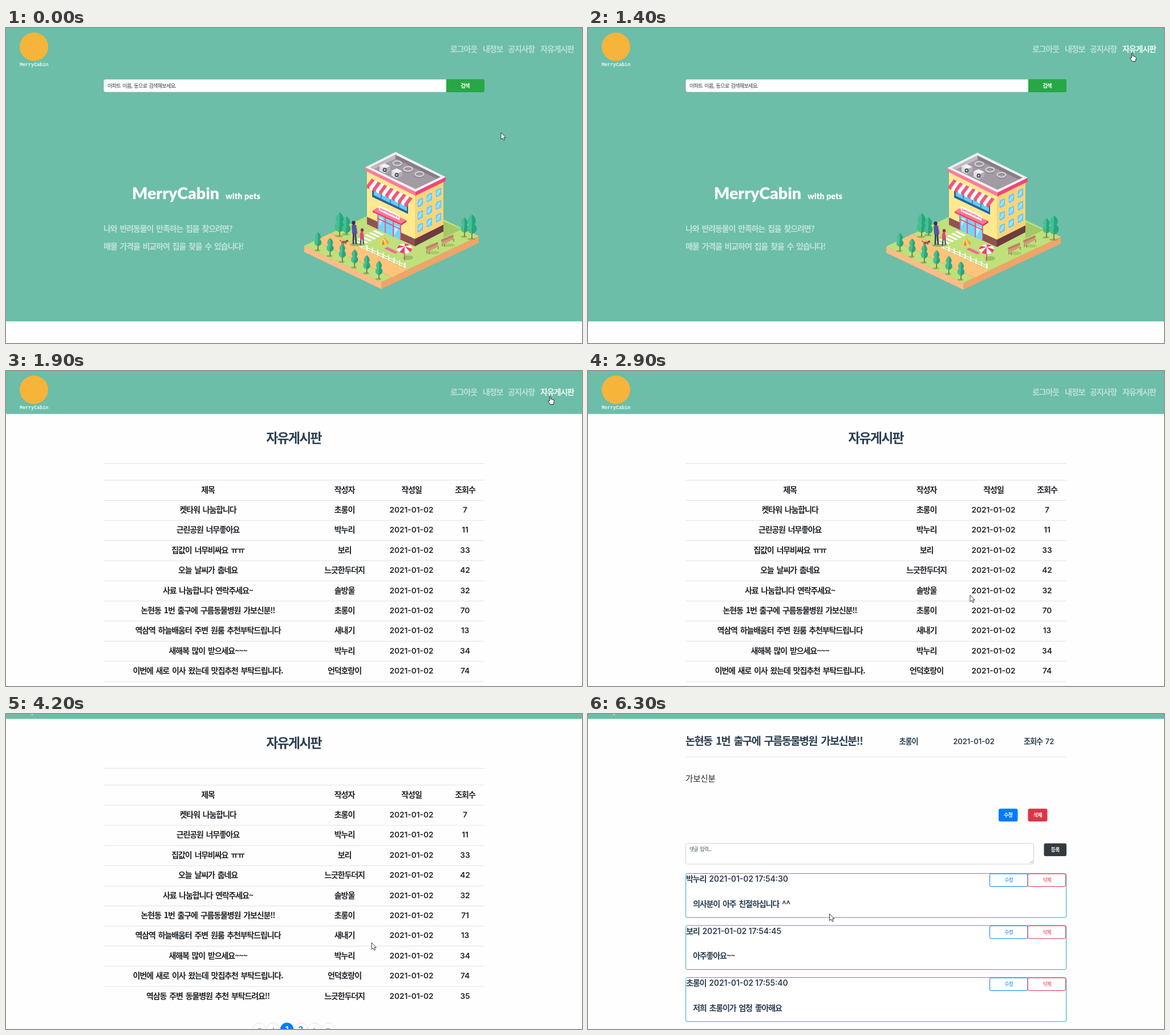
An HTML page for the animation above (8 s loop, 1010 px wide and 554 px high).

```html
<!DOCTYPE html>
<html lang="ko">
<head>
<meta charset="utf-8">
<title>MerryCabin</title>
<style>
html, body { margin: 0; width: 100%; height: 100%; overflow: hidden; background: #fefefe; }
svg { display: block; width: 1010px; height: 554px; }
text { font-family: "Noto Sans CJK KR", "Noto Sans CJK", sans-serif; font-weight: 700; letter-spacing: -.08em; word-spacing: .15em; }
.num { font-family: Inter, sans-serif; font-weight: 600; letter-spacing: 0; word-spacing: 0; }
.brand { font-family: Lato, sans-serif; font-weight: 900; letter-spacing: 0; word-spacing: 0; }
.mono { font-family: "Liberation Mono", monospace; letter-spacing: 0; }
.thin { font-weight: 500; }
.wide { font-weight: 300; letter-spacing: 0; }
</style>
</head>
<body>
<svg id="stage" viewBox="0 0 1010 554"></svg>
<script>
const GREEN = '#6cbea8', INK = '#212529', NAVY = '#2c3e50', RULE = '#dee2e6', BLUE = '#007bff', RED = '#dc3545';

// Drawing helpers, each returning SVG markup
const text = (x, y, s, size, fill = INK, anchor = 'start', cls = '') =>
  `<text x="${x}" y="${y}" font-size="${size}" fill="${fill}" text-anchor="${anchor}" class="${cls}">${s}</text>`;
const mid = (x, y, s, size, fill, cls) => text(x, y, s, size, fill, 'middle', cls);
const num = (x, y, s, size = 13.7, fill = INK) => mid(x, y, s, size, fill, 'num');
const rect = (x, y, w, h, fill, r = 0, stroke = 'none') =>
  `<rect x="${x}" y="${y}" width="${w}" height="${h}" rx="${r}" fill="${fill}" stroke="${stroke}"/>`;
const poly = (pts, fill, stroke = 'none') => `<polygon points="${pts}" fill="${fill}" stroke="${stroke}"/>`;
const path = (d, stroke, w = 1, fill = 'none') =>
  `<path d="${d}" stroke="${stroke}" stroke-width="${w}" fill="${fill}"/>`;
const oval = (x, y, rx, ry, fill, extra = '') => `<ellipse cx="${x}" cy="${y}" rx="${rx}" ry="${ry}" fill="${fill}" ${extra}/>`;
const rule = y => path(`M171 ${y}H839`, RULE);
const many = (n, f) => Array.from({ length: n }, (_, i) => f(i)).join('');
const group = (id, body) => `<g id="${id}">${body}</g>`;

function header() {
  const soft = 'rgba(255,255,255,.54)';
  return rect(0, 0, 1010, 75.6, GREEN) +
    `<circle cx="49" cy="33" r="25" fill="#f6b43a"/>` +
    text(24, 66.5, 'MerryCabin', 8.4, '#e9faf4', 'start', 'mono') +
    text(779, 42, '로그아웃', 14, soft) + text(836, 42, '내정보', 14, soft) +
    text(880, 42, '공지사항', 14, soft) +
    `<g id="hot">${text(937, 42, '자유게시판', 14, '#fff')}</g>`;
}

function tree(x, top, h, foot) {
  const w = h * .27, b = top + h;
  const half = (dir, fill) => `<path fill="${fill}" d="M${x} ${top}` +
    `C${x + dir * w * .9} ${top + h * .2} ${x + dir * w * .9} ${top + h * .4} ${x + dir * w * .5} ${top + h * .5}` +
    `C${x + dir * w * 1.2} ${top + h * .65} ${x + dir * w} ${b - h * .05} ${x} ${b}z"/>`;
  return oval(x - 1, foot, w * .8, 1.8, '#6f9a4f', 'opacity=".6"') +
    path(`M${x} ${b - 1}V${foot}`, '#8a5a4a', 1.6) + half(-1, '#43c092') + half(1, '#27a67f') +
    path(`M${x} ${b - h * .3}V${b}`, '#5f7a52', .8);
}

function ground() {
  return poly('523,383 694,302 829,366 658,447', '#bfe07a') +
    poly('523,383 658,447 658,459 523,394', '#fbbd85') +
    poly('658,447 829,366 829,378 658,459', '#f0a468') +
    poly('542,374 569,361 704,425 677,438', '#ffc47a') +
    path('M542 374L677 438M569 361L704 425', '#e5a968', .8) +
    poly('767,340 799,354 767,369', '#a3c866');
}

function roof() {
  const ring = (x, y) => oval(x, y + 1.5, 7.5, 4, 'none', 'stroke="#857e88" stroke-width="2.6"') +
    oval(x, y, 7.5, 4, 'none', 'stroke="#d2ccd2" stroke-width="2.6"');
  const fan = (x, y) => poly([x - 9, y - 5, x + 1, y, x + 1, y + 9, x - 9, y + 4], '#dddce2') +
    poly([x - 9, y - 5, x, y - 9, x + 10, y - 4, x + 1, y], '#f3f2f5') +
    poly([x + 1, y, x + 10, y - 4, x + 10, y + 4, x + 1, y + 9], '#b3b0ba') +
    oval(x, y + 2.5, 3.4, 3.8, '#4a525a') + oval(x, y + 2.5, 1.5, 1.8, '#c9d2d6');
  return poly('630,245 718,288 718,295 630,251', '#ff7a9d') +
    poly('718,288 771,262 771,269 718,295', '#f0457f') +
    poly('630,245 683,218 771,262 718,288', '#f1eff1') +
    poly('639,245 683,223 762,262 718,283', '#857e87') +
    poly('639,245 683,223 683,230 646,248', '#c0bac1') +
    poly('646,248 683,230 755,265 718,283', '#a29ba4') +
    ring(686, 238) + ring(705, 248) + ring(725, 257) + fan(664, 247) + fan(685, 256);
}

function building() {
  const wnd = i => {
    const x = 721 + 16 * (i % 3), y = 302 - 8.8 * (i % 3) + 22 * Math.floor(i / 3);
    return poly([x, y, x + 10, y - 5, x + 10, y + 10, x, y + 15], '#fff6d8') +
      poly([x + 1, y + .5, x + 9.3, y - 3.5, x + 9.3, y + 9.5, x + 1, y + 13.5], '#7ad6f8', '#5fb4da') +
      path(`M${x + 2} ${y + 9}l6-8`, '#d4f4ff', 1.3);
  };
  const stripe = i => {
    const x = 641 + 5.54 * i, y = 265 + 2.65 * i;
    return `<path fill="${i % 2 ? '#fff' : '#f8557c'}" d="M${x} ${y}l5.54 2.65-9 12v2.5q-2.5 2.5-5.54-2.5v-2.5z"/>`;
  };
  return poly('633,252 717,292 717,384 633,345', '#ffe98f') +
    poly('717,292 767,268 767,358 717,384', '#f9d476') +
    poly('633,332 717,371 717,384 633,345', '#8d5352') +
    poly('717,371 767,346 767,358 717,384', '#6d3b40') +
    poly('642,281 705,311 705,327 642,297', '#2d5f9f') +
    poly('645,283 703,311 703,322 645,294', '#62cdf5') +
    path('M658 288v12M674 296v12M689 303v12', '#2d5f9f', 1.2) +
    many(13, stripe) +
    poly('652,328 692,347 692,373 652,354', '#78d4f7') +
    poly('655,332 662,335 655,348', '#b9edff') + poly('681,346 690,350 681,364', '#b9edff') +
    path('M652 327V354M665 334V360M679 340V367M692 346V373M652 335L692 354', '#ec4670', 1.5) +
    poly('643,321 651,316 702,338 693,344', '#ff7897') +
    poly('643,321 693,344 693,347 643,324', '#ec3e6c') +
    poly('693,344 702,338 702,341 693,347', '#c92f5d') +
    poly('654,312 690,329 690,338 654,321', '#fff') +
    `<g transform="matrix(1 .47 0 1 656 319.5)">${text(0, 0, 'petshelters', 6, '#e3365f', 'start', 'num')}</g>` +
    many(9, wnd) + roof();
}

function people() {
  return oval(616, 381, 13, 2.5, '#8fae60') +
    path('M609.5 360L609 380M612.5 360L614 380', '#3d3a60', 2.8) +
    `<path fill="#5653a8" d="M606 347q4-2.5 8.5 0l1.5 15h-9z"/>` + path('M614.5 348l2.5 12', '#e8a58a', 1.4) +
    oval(609.5, 342.5, 3.2, 3.6, '#39304c') +
    path('M623 368L621.5 381M625.5 368L627 380', '#3d3a60', 2) +
    `<path fill="#e5476f" d="M621 360q3-2.5 5.5 0l1.5 10h-7.5z"/>` + oval(624.5, 355.5, 2.7, 3.3, '#8d3551') +
    path('M620 364l-3 4', '#e8a58a', 1.2) +
    oval(592.5, 376.5, 4.6, 2.2, '#94614f') + oval(598, 374.5, 2.2, 2, '#7a4d45') +
    path('M589 377v4M592 378v3M596 377v3M588 375l-3-2', '#7a4d45', 1.2);
}

function garden() {
  const bench = (x, y) => oval(x + 2, y + 9, 11, 3, '#a9ca69') +
    poly([x - 11, y - 1, x + 10, y - 10, x + 11, y - 5, x - 10, y + 4], '#c98a6c') +
    path(`M${x - 11} ${y + 1.5}l21.5-9`, '#a66a55', .8) +
    poly([x - 10, y + 4, x + 9, y - 4, x + 12, y - 2, x - 6, y + 7], '#d39a78') +
    path(`M${x - 9} ${y + 5}v6M${x - 5} ${y + 7}v5M${x + 11} ${y - 2}v5`, '#94604f', 1.1);
  const wedge = i => {
    const a = i * Math.PI / 4, p = k => `${699 + 13 * Math.cos(k)} ${388 + 8.5 * Math.sin(k)}`;
    return `<path fill="${i % 2 ? '#fff' : '#ef3e6b'}" d="M699 384L${p(a)}A13 8.5 0 0 1 ${p(a + Math.PI / 4)}z"/>`;
  };
  return many(6, i => {
    const x = 647 - 7 * i, y = 355.5 + 3.5 * i;
    return poly([x, y, x + 16, y + 7.6, x + 12, y + 9.4, x - 4, y + 1.8], '#fff');
  }) +
    poly('661,366 655,383 669,381', '#ffd15c') + poly('661,366 669,381 672,377', '#eda63c') + poly('661,372 659,382 664,381', '#c98a45') +
    poly('663,388 669,385 688,394 682,397', '#f2799a') +
    path('M666 387L685 396M669 386.5l-3 2M678 391l-3 2', '#d65078', .7) +
    path('M613 377L700 417M613 381L700 421', '#fff', 1.2) +
    many(10, i => path(`M${614 + 9.5 * i} ${373 + 4.4 * i}v10`, '#fff', 2)) +
    oval(705, 404, 9, 4, '#9dbf62') + path('M699 388V409', '#e63f68', 1.5) + many(8, wedge) +
    bench(747, 386) + bench(774, 373);
}

function scene() {
  return ground() + tree(585, 324, 35, 366) + tree(597, 331, 30, 363) + building() + garden() + people() +
    tree(804, 333, 27, 367) + tree(817, 328, 34, 371) +
    many(6, i => tree(547 + 21.4 * i, 359 + 10.1 * i, 25, 391 + 10.1 * i));
}

function home() {
  const pale = 'rgba(255,255,255,.58)';
  return rect(0, 75, 1010, 441, GREEN) +
    rect(171.5, 90.5, 620, 22, '#fff', 3, '#ced4da') + rect(772, 90, 67, 23, '#28a745', 3) + rect(772, 90, 10, 23, '#28a745') +
    text(178, 105.2, '아파트 이름, 동으로 검색해보세요.', 9.1, '#343a40', 'start', 'thin') +
    mid(805, 105.2, '검색', 9.3, '#fff') +
    text(221, 301, 'MerryCabin', 28.5, '#fff', 'start', 'brand') +
    text(385, 301, 'with pets', 14.5, '#fff', 'start', 'brand') +
    text(171, 357.5, '나와 반려동물이 만족하는 집을 찾으려면?', 14, pale) +
    text(171, 388.8, '매물 가격을 비교하여 집을 찾을 수 있습니다!', 14, pale) +
    group('scene', scene());
}

const posts = [
  ['켓타워 나눔합니다', '초롱이', 7], ['근린공원 너무좋아요', '박누리', 11],
  ['집값이 너무비싸요 ㅠㅠ', '보리', 33], ['오늘 날씨가 춥네요', '느긋한두더지', 42],
  ['사료 나눔합니다 연락주세요~', '솔방울', 32], ['논현동 1번 출구에 구름동물병원 가보신분!!', '초롱이', 70],
  ['역삼역 하늘배움터 주변 원룸 추천부탁드립니다', '새내기', 13], ['새해복 많이 받으세요~~~', '박누리', 34],
  ['이번에 새로 이사 왔는데 맛집추천 부탁드립니다.', '언덕호랑이', 74], ['역삼동 주변 동물병원 추천 부탁드려요!!', '느긋한두더지', 35]
];

function board() {
  const cols = [354, 593.5, 711, 805];
  const row = ([title, who, hits], i) => {
    const y = 249 + 35.4 * i;
    return rule(227.5 + 35.4 * i) + mid(cols[0], y, title, 14) + mid(cols[1], y, who, 14) +
      num(cols[2], y, '2021-01-02') + (i === 5 ? group('hits', num(cols[3], y, hits)) : num(cols[3], y, hits));
  };
  const page = (s, i) => `<circle cx="${444 + 24.3 * i}" cy="621.5" r="11.3" fill="${i === 2 ? BLUE : '#fff'}" stroke="${i === 2 ? BLUE : RULE}"/>` +
    num(444 + 24.3 * i, 626.5, s, 14, ['#6c757d', '#6c757d', '#fff', BLUE][i] || '#6c757d');
  return mid(504.5, 126, '자유게시판', 23, NAVY) + rule(162.5) + rule(192) +
    ['제목', '작성자', '작성일', '조회수'].map((s, i) => mid(cols[i], 214, s, 14)).join('') +
    posts.map(row).join('') + ['«', '‹', '1', '2', '›', '»'].map(page).join('');
}

function detail() {
  const button = (x, y, w, s, fill) => rect(x, y, w, 22.5, fill, 3) + mid(x + w / 2, y + 14.6, s, 8.8, '#fff');
  const outline = (x, y, s, c) => rect(x, y, 66.5, 22.5, '#fff', 2.5, c) + mid(x + 33.3, y + 14.4, s, 8.8, c, 'thin');
  const note = ([who, time, body], i) => {
    const y = 280.5 + 91.5 * i;
    return rect(171.5, y, 667, 77.5, '#fff', 3, '#2aabb5') + text(172, y + 14.8, who, 14, NAVY) +
      text(177 + who.length * 11.76, y + 14.8, '2021-01-02 ' + time, 13.8, NAVY, 'start', 'num') +
      text(184, y + 58, body, 14, NAVY) +
      outline(704.5, y + .5, '수정', BLUE) + outline(771.2, y + .5, '삭제', RED);
  };
  const notes = [
    ['박누리', '17:54:30', '의사분이 아주 친절하십니다 ^^'],
    ['보리', '17:54:45', '아주좋아요~~'],
    ['초롱이', '17:55:40', '저희 초롱이가 엄청 좋아해요']
  ];
  return text(171, 54.3, posts[5][0], 18.5, NAVY) + mid(562, 52.7, '초롱이', 13.1, NAVY) +
    num(676.5, 52.7, '2021-01-02', 12.9, NAVY) + text(764, 52.7, '조회수', 13.1, NAVY) +
    num(809.5, 52.7, '72', 12.9, NAVY) + rule(75) +
    text(171, 118.5, '가보신분', 14.3, INK, 'start', 'wide') +
    button(720, 166.5, 33.5, '수정', BLUE) + button(771.5, 166.5, 34, '삭제', RED) +
    rect(171.5, 227.5, 610, 36.5, '#fff', 3, '#ced4da') +
    text(178, 241.3, '댓글 입력...', 8.9, '#495057', 'start', 'thin') +
    path('M775 262.5l5-5M778 262.5l2-2', '#777', .8) +
    button(799.5, 227.5, 39.5, '등록', '#343a40') +
    group('notes', notes.map(note).join(''));
}

const cursors = {
  arrow: path('M0 0V11.8L2.8 9.4L4.8 13.6L6.7 12.7L4.8 8.7H8.3z', '#222', .9, '#fff'),
  hand: path('M3.2 1.2q1.4-1.2 2 .4v4.6l4.6 1.4q1.6.6 1.3 2.6l-1 5.6H4.6L.9 11q-.9-1.5.4-2l1.9 1z', '#222', 1, '#fff'),
  beam: path('M-2.5 -6H2.5M0 -6V5.5M-2.5 5.5H2.5', '#333', 1)
};

const stage = document.getElementById('stage');
stage.innerHTML = group('home', home()) + group('board', board()) + group('detail', detail()) +
  group('head', header()) + Object.keys(cursors).map(k => group(k, cursors[k])).join('');
const $ = id => document.getElementById(id);
const show = (id, on) => { $(id).style.display = on ? '' : 'none'; };
const move = (id, x, y) => $(id).setAttribute('transform', `translate(${x} ${y})`);

// time, x, y, cursor shape
const moves = [
  [0, 868, 184, 'arrow'], [700, 872, 176, 'arrow'], [800, 900, 138, 'arrow'], [900, 933, 92, 'arrow'],
  [1000, 945, 62, 'arrow'], [1100, 950, 43, 'hand'], [2300, 949, 47, 'hand'], [2400, 944, 69, 'arrow'],
  [2500, 915, 119, 'arrow'], [2600, 898, 174, 'arrow'], [2700, 870, 258, 'arrow'], [2800, 790, 338, 'arrow'],
  [2900, 670, 394, 'arrow'], [3100, 667, 395, 'arrow'], [3400, 652, 399, 'arrow'], [3600, 645, 402, 'arrow'],
  [4200, 641, 402, 'arrow'], [4300, 535, 398, 'arrow'], [4400, 513, 389, 'arrow'], [4500, 482, 380, 'arrow'],
  [4600, 441, 368, 'arrow'], [4700, 436, 367, 'arrow'], [4900, 433, 364, 'beam'], [5000, 431.5, 361.5, 'beam'],
  [5600, 428, 356, 'beam'], [5700, 426, 353, 'beam'], [6000, 423.5, 351.5, 'arrow']
];
const scrolls = [[0, 0], [3400, 12], [3500, 33], [3600, 57], [3700, 67]];
const at = (steps, t) => steps.filter(s => s[0] <= t).pop();

function draw(now) {
  const t = Math.floor(now % 8000 / 100) * 100;
  const scroll = at(scrolls, t)[1];
  const [, x, y, shape] = at(moves, t);
  show('home', t < 1900);
  show('board', t >= 1900 && t < 6000);
  show('detail', t >= 6000);
  show('notes', t >= 6100);
  move('scene', 0, (2 + 2.5 * Math.cos(Math.PI * (t / 1000 - .8))).toFixed(2));
  move('head', 0, -scroll);
  move('board', 0, -scroll);
  $('hot').style.opacity = shape === 'hand' ? .9 : .54;
  $('hits').firstChild.textContent = t < 3400 ? 70 : 71;
  for (const k in cursors) show(k, k === shape);
  move(shape, x, y);
}

const start = performance.now();
function tick() {
  draw(performance.now() - start);
  requestAnimationFrame(tick);
}
tick();
</script>
</body>
</html>
```
